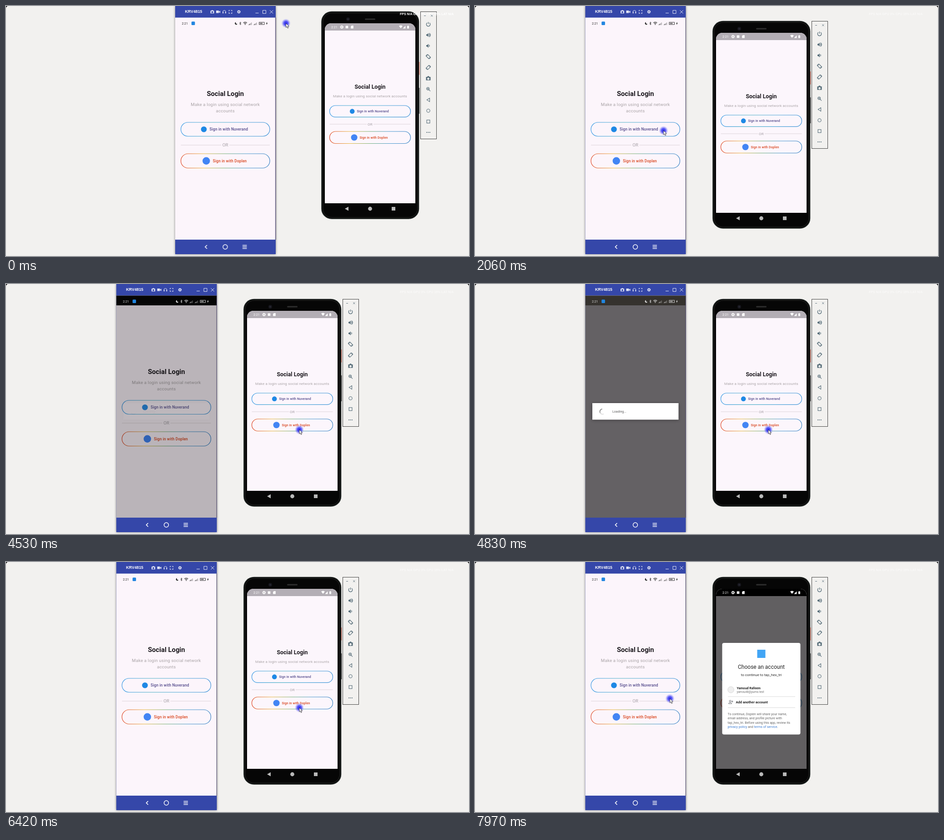
These frames come from a looping animation (1018 px wide and 550 px high, 8 s). An HTML page:

```html
<!DOCTYPE html>
<html lang="en">
<head>
<meta charset="utf-8">
<title>Login demo</title>
<style>
html, body { margin: 0; width: 100%; height: 100%; overflow: hidden; background: #f2f1ef; }
svg { display: block; width: 1018px; height: 550px; font-family: Roboto, sans-serif; }
.line { fill: none; stroke: currentColor; }
.solid { fill: currentColor; }
.b { font-weight: 700; }
.m { font-weight: 500; }
.mid { text-anchor: middle; }
.anim, .anim * { animation-duration: 8s; animation-iteration-count: infinite; animation-timing-function: linear; }

/* 1% = 80 ms */
#phone { animation-name: phone; }
#emu { animation-name: emu; }
#cursor { animation-name: cursor; animation-timing-function: ease-in-out; }
#fps { animation-name: fps; }
#bar { animation-name: bar; }
#barIcons { animation-name: barIcons; }
#page { animation-name: page; }
#dim { animation-name: dim; }
#loading { animation-name: loading; }
#wait { animation-name: wait; }
#emuBar { animation-name: emuBar; }
#emuDim { animation-name: emuDim; }
#chooser { animation-name: chooser; transform-origin: 629.5px 278px; }
.anim .spin { animation-name: spin; animation-duration: 1s; }

@keyframes phone { 0%, .99% { transform: translate(129.5px, 0); } 1%, 100% { transform: none; } }
@keyframes emu { 0%, .99% { transform: translate(171px, -21px); } 1%, 100% { transform: none; } }
@keyframes cursor {
  0%, .99% { transform: translate(615.5px, 38px); }
  1% { transform: translate(700px, 60px); }
  17% { transform: translate(409px, 283px); }
  20.5%, 29% { transform: translate(414.5px, 274px); animation-timing-function: ease-in; }
  41.4% { transform: translate(584.5px, 309px); animation-timing-function: ease-out; }
  46.1%, 95.5% { transform: translate(645px, 320.5px); }
  99.6%, 100% { transform: translate(428.5px, 300.5px); }
}
@keyframes fps { 0%, .99% { opacity: 1; } 1%, 100% { opacity: .55; } }
@keyframes bar {
  0%, 28.74% { fill: #050505; opacity: 0; }
  28.75%, 56.6% { fill: #050505; opacity: 1; }
  58.75%, 78.1% { fill: #35322e; opacity: 1; }
  80%, 100% { fill: #35322e; opacity: 0; }
}
@keyframes barIcons {
  0%, 28.74% { color: #2b2b2b; }
  28.75%, 78.1% { color: #d8d8d8; }
  80%, 100% { color: #2b2b2b; }
}
@keyframes page { 0%, 56.7% { opacity: 1; } 58.75%, 78.1% { opacity: 0; } 80%, 100% { opacity: 1; } }
@keyframes dim { 0%, 56.1% { opacity: 0; } 56.625% { opacity: .26; } 58.75%, 78.1% { opacity: .6; } 80%, 100% { opacity: 0; } }
@keyframes loading { 0%, 56.4% { opacity: 0; } 56.7% { opacity: .06; } 58.75%, 78.1% { opacity: 1; } 79.5%, 100% { opacity: 0; } }
@keyframes wait { 0%, 28.74% { opacity: 0; } 28.75%, 48.2% { opacity: 1; } 48.25%, 100% { opacity: 0; } }
@keyframes emuBar { 0%, 80.6% { fill: #b3aeb5; } 83.75%, 100% { fill: #000; } }
@keyframes emuDim { 0%, 80.6% { opacity: 0; } 83.75%, 100% { opacity: .61; } }
@keyframes chooser {
  0%, 89.1% { opacity: 0; transform: scale(.94); }
  92.2%, 100% { opacity: 1; transform: none; }
}
@keyframes spin { to { transform: rotate(360deg); } }
</style>
</head>
<body>
<svg id="stage" class="anim" viewBox="0 0 1018 550"></svg>
<script>
const at = (x, y, inner, extra = '') => `<g transform="translate(${x} ${y})" ${extra}>${inner}</g>`;
const text = (x, y, size, str, attrs = '') => `<text x="${x}" y="${y}" font-size="${size}" ${attrs}>${str}</text>`;
const rect = (x, y, w, h, attrs = '') => `<rect x="${x}" y="${y}" width="${w}" height="${h}" ${attrs}/>`;
const disc = (x, y, r, attrs = '') => `<circle cx="${x}" cy="${y}" r="${r}" ${attrs}/>`;
const line = (d, w = 1, attrs = '') => `<path class="line" d="${d}" stroke-width="${w}" ${attrs}/>`;
const solid = (d, attrs = '') => `<path class="solid" d="${d}" ${attrs}/>`;

const icon = {
  camera: '<path class="solid" fill-rule="evenodd" d="M-4-2.5h2l1-1.4h2l1 1.4h2v6h-8zM0-1.3a2 2 0 1 0 .01 0z"/>',
  video: solid('M-4.5-2.8h6v5.6h-6zM1.8-.6l2.8-2v5.2l-2.8-2z'),
  headset: line('M-3.2 1V0a3.2 3.2 0 0 1 6.4 0v1') + solid('M-3.8 0h2v3.5h-2zM1.8 0h2v3.5h-2z'),
  full: line('M-3.3-1.2v-2.1h2.1M1.2-3.3h2.1v2.1M3.3 1.2v2.1h-2.1M-1.2 3.3h-2.1v-2.1', 1.1),
  gear: disc(0, 0, 2.1, 'class="line" stroke-width="1.7"') + disc(0, 0, 3.3, 'class="line" stroke-width="1.2" stroke-dasharray="1.3 1.3"'),
  moon: solid('M-.3-3a3 3 0 1 0 3.3 4.2a3 3 0 0 1-3.3-4.2z'),
  bluetooth: line('M-1.7-1.6l3.4 3.2l-1.7 1.6v-6.4l1.7 1.6l-3.4 3.2', .8),
  wifi: line('M-4-1.3a5.6 5.6 0 0 1 8 0M-2.4.5a3.4 3.4 0 0 1 4.8 0', 1.1) + disc(0, 2.2, 1, 'class="solid"'),
  bars: [0, 1, 2, 3].map(i => rect(-4 + i * 2, 2.5 - i * 1.5, 1.2, 1 + i * 1.5, `class="solid" opacity="${i < 2 ? 1 : .45}"`)).join(''),
  bolt: solid('M.8-3.2l-2.8 3.7h1.6l-.6 2.7l2.9-3.7h-1.7z'),
  fan: solid('M-4-2.4a6 6 0 0 1 8 0l-4 5z'),
  power: line('M-2.6-2.9a4.2 4.2 0 1 0 5.2 0M0-4.8v4.6', 1.3),
  speaker: solid('M-4.5-1.6h2.1l2.7-2.7v8.6l-2.7-2.7h-2.1z') + line('M1.6-2a2.4 2.4 0 0 1 0 4', 1.2),
  wave: line('M1.8-4.1a4.4 4.4 0 0 1 0 8.2', 1.2),
  rotate: rect(-2.5, -3.9, 5, 7.8, 'class="line" stroke-width="1.2" transform="rotate(-45)"') + line('M-5.3-1a5 5 0 0 1 3.5-4M5.3 1a5 5 0 0 1-3.5 4', 1),
  zoom: disc(-.9, -.9, 2.9, 'class="line" stroke-width="1.2"') + line('M1.3 1.3l3.2 3.2M-2.3-.9h2.8M-.9-2.3v2.8', 1.1),
};
const arc = (r, sweep, phase, w, color) => at(0, 0, `<g class="spin">${disc(0, 0, r,
  `fill="none" stroke="${color}" stroke-width="${w}" pathLength="360" stroke-dasharray="${sweep} ${360 - sweep}" transform="rotate(${phase})"`)}</g>`);

// The login form, shared by both devices; k scales the type
function login({ x0, x1, k, title, sub, subY, or, fb, go }) {
  const cx = (x0 + x1) / 2, ls = `letter-spacing="${.25 * k}"`, gap = 17.5 * k;
  const button = (o, name, fill, dot, stroke) =>
    rect(x0, o.y, x1 - x0, o.h, `rx="${o.h / 2}" fill="none" stroke="url(#${stroke})" stroke-width="1.2"`) +
    disc(o.x, o.y + o.h / 2, o.r, `fill="${dot}"`) +
    text(o.tx, o.y + o.h / 2 + 4.2 * k, 12 * k, 'Sign in with ' + name, `class="m" fill="${fill}" ${ls}`);
  return text(cx, title.y, title.size, 'Social Login', 'class="b mid" fill="#1c191e"') +
    sub.map((s, i) => text(cx, subY + i * 14, 14 * k, s, `class="mid" fill="#aaa4a7" ${ls}`)).join('') +
    button(fb, 'Nuverand', '#50478a', '#1e88e5', 'cool') +
    line(`M${x0} ${or}H${cx - gap / 1.4}M${cx + gap / 1.4} ${or}H${x1}`, 1, 'style="color:#ddd3d9"') +
    text(cx, or + 5 * k, 14 * k, 'OR', `class="mid" fill="#a39da3" ${ls}`) +
    button(go, 'Doplen', '#d8431b', '#4285f4', 'warm');
}

const gradient = (id, colors) => `<linearGradient id="${id}">${colors.map((c, i) =>
  `<stop offset="${i / (colors.length - 1)}" stop-color="${c}"/>`).join('')}</linearGradient>`;
const defs = `<defs>
  ${gradient('cool', ['#3d9be6', '#52b3c6', '#4fa8d8', '#3f93d8'])}
  ${gradient('warm', ['#e0492b', '#e9b93f', '#74b179', '#4a9ad0', '#3b83c4'])}
  <radialGradient id="spot">
    <stop offset="0" stop-color="#2323f0"/><stop offset=".45" stop-color="#3c3cf4" stop-opacity=".85"/>
    <stop offset="1" stop-color="#7070ff" stop-opacity="0"/>
  </radialGradient></defs>`;

const phone = `<g id="phone">
  ${rect(242.5, 0, 221, 546, 'fill="#3547a9" style="filter:drop-shadow(0 0 2.5px #0007)"')}
  ${text(264, 15.2, 8.8, 'KRV4815', 'class="b" fill="#fff" font-family="Liberation Sans, sans-serif"')}
  <g style="color:#dfe3f5">
    ${['camera', 'video', 'headset', 'full', 'gear'].map((n, i) => at([324, 337, 350.5, 364, 382.5][i], 12.8, icon[n])).join('')}
    ${line('M419 15.5h7M435 9.5h7v7h-7zM450.5 9.3l7.2 7.2M457.7 9.3l-7.2 7.2', 1)}
  </g>
  ${rect(242.5, 25.5, 220.5, 488.5, 'fill="#fcf5fb"')}
  <g id="page">${login({
    x0: 255, x1: 450.5, k: .695, title: { y: 198.3, size: 14.8 },
    sub: ['Make a login using social network', 'accounts'], subY: 220.2, or: 306,
    fb: { y: 256, h: 30.5, x: 305.5, r: 6.3, tx: 318 },
    go: { y: 325, h: 31.5, x: 310.8, r: 8.2, tx: 325.3 } })}</g>
  ${rect(242.5, 47, 220.5, 467, 'id="dim" opacity="0"')}
  ${rect(242.5, 25.5, 220.5, 21.5, 'id="bar" opacity="0"')}
  <g id="barIcons">
    ${text(257, 40.8, 6.9, '2:21', 'class="solid"')}
    ${rect(278.3, 34.3, 7.6, 7.6, 'rx="1.5" fill="#2186e0"')}
    ${['moon', 'bluetooth', 'wifi', 'bars', 'bars', 'bolt'].map((n, i) => at([376.3, 385.6, 396.3, 407.5, 419, 444][i], 38.3, icon[n])).join('')}
    ${rect(427, 35.8, 11.5, 5, 'class="line" stroke-width=".9"') + rect(428.5, 37.2, 6, 2.2, 'class="solid" opacity=".7"')}
  </g>
  ${at(352.5, 280.5, arc(12.5, 120, 143, 2.6, '#62b8b2'), 'id="wait" opacity="0"')}
  <g id="loading" opacity="0">
    ${rect(258, 262, 189.5, 36.5, 'fill="#fff" style="filter:drop-shadow(0 1px 3px #0006)"')}
    ${at(280.3, 280.8, arc(5.8, 205, 123, 1.4, '#d2d2d2') + arc(5.8, 110, 215, 1.5, '#858585'))}
    ${text(302, 283.4, 7.1, 'Loading...', 'fill="#5c5c5c"')}
  </g>
  ${line('M463.2 25.5V514', .8, 'style="color:#4a3c52"')}
  <g style="color:#fff">${line('M312.5 526l-4 4l4 4', 1.7)}${disc(352.5, 530, 5, 'class="line" stroke-width="1.4"')}${line('M390.5 526.5h9.5M390.5 530h9.5M390.5 533.5h9.5', 1.6)}</g>
</g>`;

const panel = `<g style="color:#566d79">
  ${rect(740.5, 33.5, 35, 280, 'fill="#f2f1ef" stroke="#474747"')}
  ${line('M748 42.5h4M763.3 40.3l4 4M767.3 40.3l-4 4', .9)}
  ${[icon.power, icon.speaker + icon.wave, icon.speaker, icon.rotate, `<g transform="scale(-1 1)">${icon.rotate}</g>`,
    `<g transform="scale(1.25)">${icon.camera}</g>`, icon.zoom, line('M3-3.8v7.6l-6.2-3.8z', 1.1),
    disc(0, 0, 3.6, 'class="line" stroke-width="1.1"'), rect(-3.4, -3.4, 6.8, 6.8, 'class="line" stroke-width="1.1"'),
    [-3.4, 0, 3.4].map(x => disc(x, 0, 1.1, 'class="solid"')).join('')].map((s, i) => at(757.5, 61 + i * 23.8, s)).join('')}
</g>`;

const blue = s => `<tspan fill="#3b7bd0">${s}</tspan>`;
const terms = ['To continue, Doplen will share your name,', 'email address, and profile picture with',
  'tap_hex_tri. Before using this app, review its', `${blue('privacy policy')} and ${blue('terms of service')}.`];
const chooser = `<g id="chooser" opacity="0">
  ${rect(543.5, 178, 172, 201.5, 'rx="4" fill="#fff"')}
  ${rect(620.5, 193, 18, 18, 'fill="#42a5f5"')}
  ${text(629.5, 235.3, 12, 'Choose an account', 'class="mid" fill="#222"')}
  ${text(629.5, 251.2, 8, 'to continue to tap_hex_tri', 'class="mid" fill="#2c2c2c"')}
  ${disc(562.6, 281, 6.9, 'fill="#efefef" stroke="#d4d4d4" stroke-width=".8"')}
  ${text(575.5, 279.6, 7.1, 'Yamoud Rafeem', 'class="b" fill="#222"')}
  ${text(575.5, 288.3, 6.3, 'yamou48@pumo.test', 'fill="#757575"')}
  ${line('M556 296H704M556 320.5H704', .9, 'style="color:#d6d6d6"')}
  <g style="color:#5f6368">${disc(561, 306, 1.9, 'class="line" stroke-width=".9"')}${line('M557.5 311.8c0-3.6 7-3.6 7 0zM565.7 304.8v4M563.8 306.8h3.8', .9)}</g>
  ${text(573.5, 311, 7.5, 'Add another account', 'class="b" fill="#222"')}
  ${terms.map((s, i) => text(555.5, 336.6 + i * 9.6, 7.1, s, 'fill="#666"')).join('')}
</g>`;

const emu = `<g id="emu">
  ${rect(736, 144, 2.2, 28.5, 'fill="#f0654c"')}${rect(736, 201, 2.2, 57, 'fill="#151515"')}
  ${rect(523, 33.5, 213.5, 455.5, 'rx="22" fill="#060606" stroke="#252b29" stroke-width="1.6"')}
  ${rect(525.8, 36.2, 208, 450, 'rx="19.5" fill="none" stroke="#30312f" stroke-width=".8"')}
  ${disc(581, 50, 4, 'fill="#17171d"')}${disc(581, 50, 1.5, 'fill="#2c2c38"')}
  ${rect(618, 48.5, 23, 3, 'rx="1.5" fill="#2e2e2e"')}
  <path d="M530 455V73a14 14 0 0 1 14-14h171a14 14 0 0 1 14 14v382z" fill="#fcf6fc"/>
  ${login({
    x0: 540.5, x1: 718.5, k: .578, title: { y: 203.4, size: 12.3 },
    sub: ['Make a login using social network accounts'], subY: 221.6, or: 281,
    fb: { y: 240, h: 25.3, x: 590.2, r: 5.3, tx: 600.5 },
    go: { y: 297, h: 26.5, x: 594.6, r: 7, tx: 606.5 } })}
  ${rect(530, 75, 199, 380, 'id="emuDim" opacity="0"')}
  <path id="emuBar" d="M530 75v-2a14 14 0 0 1 14-14h171a14 14 0 0 1 14 14v2z" fill="#b3aeb5"/>
  <g style="color:#fff">
    ${text(544, 70, 7.1, '2:21', 'class="solid"')}
    ${at(567.3, 67.3, icon.gear, 'opacity=".95"')}${rect(575.7, 64.5, 5.6, 5.6, 'class="solid"')}
    ${solid('M587.2 66l1.8-2h3.8v6.6h-5.6z')}
    ${at(697, 67.5, icon.fan)}${solid('M701.5 70.5l5.8-6v6zM711 65h1.2v-1h1.6v1h1.2v5.5h-4z')}
  </g>
  <g style="color:#b9b9b9">${solid('M582 462.6v8.8l-8-4.4z')}${disc(629.5, 467, 4.4, 'class="solid"')}${rect(677, 463, 8, 8, 'class="solid"')}</g>
  ${chooser}${panel}
</g>`;

const cursor = `<g id="cursor">${disc(0, 0, 10, 'fill="url(#spot)"')}
  <path d="M0 0v9.2l2.1-1.9l1.6 3.5l1.6-.7l-1.5-3.4h2.9z" fill="#fff" stroke="#222" stroke-width=".8"/></g>`;

document.getElementById('stage').innerHTML = defs + rect(0, 0, 1018, 550, 'fill="#f2f1ef"') +
  '<path d="M0 0h5a5 5 0 0 0-5 5zM1018 0h-5a5 5 0 0 1 5 5z"/>' + phone + emu +
  text(866, 20, 7, 'FPS N/A GPU 0% CPU 15% LAT N/A', 'id="fps" class="b" fill="#fff" font-family="Liberation Sans, sans-serif"') + cursor;
</script>
</body>
</html>
```
